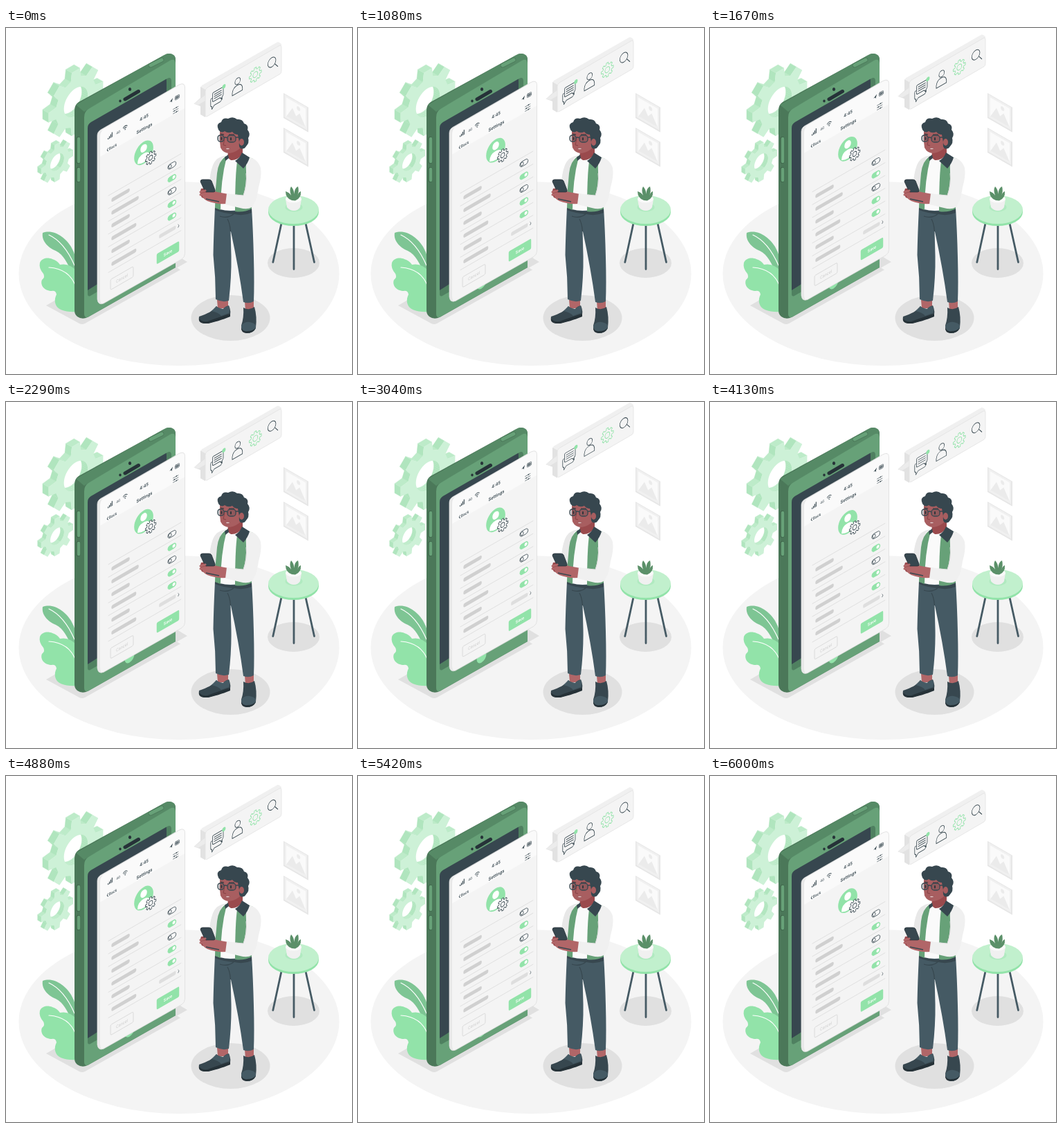
Write an HTML page that moves like this. It is 500 px wide and 500 px high and loops after 6.04 s.

```html
<!DOCTYPE html>
<html lang="en">
<head>
<meta charset="utf-8">
<title>Settings</title>
<style>
html, body { margin: 0; width: 100%; height: 100%; overflow: hidden; background: #fff; }
svg { display: block; width: 100vw; height: 100vh; }
text { font-family: Inter, "Open Sans", sans-serif; text-anchor: middle; }
.b { font-weight: 600; }
.line { fill: none; stroke: #37474f; stroke-width: .9; stroke-linecap: round; stroke-linejoin: round; }
.fine { stroke-width: .6; }
.vein { fill: none; stroke: #fff; stroke-width: 1.2; stroke-linecap: round; }
</style>
</head>
<body>
<svg viewBox="0 0 500 500">
  <!-- floor and shadows -->
  <ellipse cx="250" cy="355" rx="231.5" ry="133" fill="#f4f4f4"/>
  <g fill="#e0e0e0">
    <path d="M58 401L105 374L242 326L262 338L247 346.500L252 349.500L114 427Q110 429 106 427Z"/>
    <ellipse cx="324.500" cy="419" rx="57" ry="33"/>
    <ellipse cx="415.500" cy="339.500" rx="37.500" ry="21.500"/>
  </g>
  <g id="cogs"></g>

  <!-- plant by the phone -->
  <path d="M53 296C69 290 86 303 94 316Q103 331 103 352L95 352C88 340 84 328 72 322C60 317 51 307 53 296Z" fill="#7ec594"/>
  <path class="vein" d="M62 299Q84 309 99 343"/>
  <path d="M49 339C53 331 62 332 67 334Q74 336 78 342Q92 339 103 352V410C87 411 73 408 71 397Q70 391 73 385Q72 379 66 380C55 380 49 371 52 364Q57 360 54 355Q47 347 49 339Z" fill="#92e3a9"/>
  <path class="vein" d="M62 346C78 347 94 354 101 374"/>

  <!-- big phone -->
  <path d="M99 119Q99 111 105 107L228 39.500Q236 35 242 39Q245 41 245 46V346L118 418Q110 422 103 417Q99 414 99 408Z" fill="#4b7859"/>
  <path d="M101 111L228 39.500Q236 35 242 39Q245 41 245 47L119 117L113 121Z" fill="#568a66"/>
  <path d="M113 129Q113 121 119 117L237 47Q245 43 245 52V346L119 417.500Q113 420 113 413Z" fill="#67a178"/>
  <path d="M209 54L225 46" stroke="#4b7859" stroke-width="6.500" stroke-linecap="round"/>
  <path d="M209 54L225 46" stroke="#67a178" stroke-width="5" stroke-linecap="round"/>
  <g stroke-linecap="round" fill="none">
    <path d="M104.500 160V193M104.500 204V220" stroke="#3d6449" stroke-width="6"/>
    <path d="M105 160V193M105 204V220" stroke="#67a178" stroke-width="4.500"/>
  </g>
  <clipPath id="hole"><path d="M118 145Q118 139 123 136L233 73Q239 70 239 77V313Q239 318 235 321L122 387Q118 389 118 384Z"/></clipPath>
  <g clip-path="url(#hole)">
    <rect x="110" y="60" width="140" height="340" fill="#4f8060"/>
    <path d="M110 60H228Q232 70 232 78V307L118 379H110Z" fill="#37474f"/>
  </g>
  <g fill="#263238">
    <path d="M172 103L191.500 91.500" stroke="#263238" stroke-width="5" stroke-linecap="round"/>
    <ellipse cx="165" cy="105.500" rx="1.700" ry="2.100"/>
    <ellipse cx="179" cy="88.500" rx="2.100" ry="2.600"/>
  </g>
  <circle r="8" transform="matrix(.866 -.5 0 1 178.500 368.500)" fill="#92e3a9"/>

  <!-- settings sheet -->
  <g id="sheet">
    <path d="M132 155.500Q132 150 137 147L250 82Q258.500 78 258.500 86V326Q258.500 331 254 334L141 398Q133 401 132 392Z" fill="#f4f4f4" stroke="#dedede" stroke-width=".8"/>
    <path d="M133 156Q133 151 138 148L250 83Q258 79 258 87V116L138 185L133 188Z" fill="#fafafa"/>
    <path d="M132.500 155.500V392Q133 398 138 398Q136 396 136 390V157Q136 151 140 147Q132.500 150 132.500 155.500Z" fill="#e8e8e8"/>
    <g transform="matrix(.866 -.5 0 1 132 152)">
      <path d="M18 18V16M20.200 18V14.500M22.400 18V12.800M24.600 18V11" stroke="#37474f" stroke-width="1.300"/>
      <g fill="#37474f">
        <text x="35" y="18" font-size="5">4G</text>
        <text x="78" y="18.500" font-size="6.400" class="b">4:45</text>
        <text x="78.500" y="34.500" font-size="6.600" class="b">Settings</text>
        <text x="26" y="34.500" font-size="5.700" font-weight="500">Back</text>
        <path d="M120.500 15.500L126 12L124 17.500L123 15.500Z"/>
        <rect x="130.500" y="13" width="5.500" height="3.600" rx="1" fill="#6b777d"/>
        <circle cx="46.500" cy="17.800" r=".8"/>
      </g>
      <rect x="129.700" y="12.200" width="7.200" height="5.200" rx="1.300" class="line fine"/>
      <path class="line" d="M18 30.700L16.300 32.700L18 34.700M43 14.200Q46.500 11 50 14.200M44.600 16Q46.500 14.300 48.400 16"/>
      <path class="line fine" d="M126.500 28.800H135M126.500 32H135M126.500 35.200H135"/>
      <path d="M132 28.800h.1M128.500 32h.1M132 35.200h.1" stroke="#37474f" stroke-width="1.700" stroke-linecap="round"/>
      <circle cx="77.400" cy="67" r="16" fill="#92e3a9"/>
      <circle cx="77.400" cy="60.500" r="5.500" fill="#fff"/>
      <path d="M67 78Q67 68 77.400 68Q87.800 68 87.800 78Q77.400 84 67 78Z" fill="#fff"/>
      <path id="avatarCog" fill="#f8f8f8" stroke="#37474f" stroke-width=".9" stroke-linejoin="round" transform="translate(89 80)"/>
      <circle cx="89" cy="80" r="3.300" class="line"/>
      <g id="rows"></g>
      <rect x="103" y="198.500" width="28" height="5.500" rx="2" fill="#dedede"/>
      <path class="line fine" d="M134.800 199.500L136.300 201.500L134.800 203.500"/>
      <rect x="99" y="224" width="37.500" height="15" rx="2" fill="#92e3a9"/>
      <text x="117.700" y="233.800" font-size="6" class="b" fill="#fff">Save</text>
      <rect x="22" y="222.500" width="38" height="15" rx="2" fill="none" stroke="#d6d6d6" stroke-width=".8"/>
      <text x="41" y="232.300" font-size="6" fill="#cbcbcb">Cancel</text>
    </g>
  </g>

  <!-- floating menu -->
  <g id="menu">
    <path d="M281 86L283 83L392 20.500Q394 19.500 398 23.500V28L288 92Z" fill="#f0f0f0"/>
    <path d="M281 85L288 89V129L281 125V113L271.500 109.500L281 101Z" fill="#e2e2e2"/>
    <path d="M271.500 109.500L288 97V105L278 111Z" fill="#ececec"/>
    <path d="M288 92Q288 88 291 86L395 25.500Q398 24 398 28V62Q398 65 396 66.500L291 127.500Q288 129 288 126Z" fill="#f4f4f4" stroke="#e2e2e2" stroke-width=".8"/>
    <g transform="matrix(.866 -.5 0 1 288 89)">
      <path class="line" d="M11 18Q9 18 9 20V28Q9 30 11 30V34L15 30H25Q27 30 27 28V25"/>
      <path class="line" d="M14 11H28Q30 11 30 13V22Q30 24 28 24V28L24.500 24H14Q12 24 12 22V13Q12 11 14 11ZM15 14.500H27M15 17.500H27M15 20.500H27"/>
      <circle cx="31" cy="11" r="3" fill="#92e3a9"/>
      <circle cx="54" cy="14.800" r="4.500" class="line"/>
      <path class="line" d="M45 31.500V28Q46 20.500 53.500 20.500Q61 20.500 62 28V31.500Z"/>
      <path id="menuCog" fill="none" stroke="#92e3a9" stroke-linejoin="round" transform="translate(83.500 20)"/>
      <circle cx="83.500" cy="20" r="4" fill="none" stroke="#92e3a9"/>
      <circle cx="111" cy="16" r="6.700" class="line"/>
      <path class="line" d="M116 20.700L121 27"/>
    </g>
  </g>

  <g id="frames"></g>

  <!-- table -->
  <path d="M398.500 280L385.800 338.500M416 283V348.500M432.500 280L445.500 338.500" fill="none" stroke="#455a64" stroke-width="2.800" stroke-linecap="round"/>
  <path d="M379 262V266A36.500 20 0 0 0 452 266V262Z" fill="#92e3a9"/>
  <ellipse cx="415.500" cy="262.500" rx="36.500" ry="20.500" fill="#c1f0cd"/>
  <ellipse cx="416" cy="259" rx="12.500" ry="6.500" fill="#b0eac0"/>
  <path d="M404 247L406 259Q410 264 416 264Q422 264 425 259L427 247Z" fill="#f0f0f0"/>
  <ellipse cx="415.500" cy="247" rx="11.500" ry="5.500" fill="#fafafa"/>
  <path d="M413 249Q404 246 404 236Q410 238 412 242Q409 234 412 229Q416 233 416.500 240Q417 231 422 229Q424 236 421 242Q423 237 426 236Q427 246 418 249.500Z" fill="#5b9069"/>

  <!-- man -->
  <path d="M305 393H321V405H306ZM345 395H358V409H346Z" fill="#b16668"/>
  <path d="M279 417C291 413 299 409 304 402Q308 406 314 406Q317 402 322 401Q326 410 323 417C312 421 301 424 292 427Q277 428 279 417Z" fill="#37474f"/>
  <path d="M279 419Q281 425 291 424Q310 417 324 413V417C312 422 301 425 292 427Q277 428 279 419Z" fill="#263238"/>
  <path d="M297 409Q307 411 311 416L322 412Q324 406 322 402Q317 402 314 406Q307 405 304 402Z" fill="#455a64"/>
  <path d="M343 404Q351 409 359 403Q363 417 361 433Q357 441 348 441Q339 439 340 430Q344 418 343 404Z" fill="#37474f"/>
  <path d="M340 430Q345 424 352 425Q359 426 361 430V434Q357 441 348 441Q339 439 340 430Z" fill="#455a64"/>
  <path d="M340 433Q342 439 349 438Q357 438 361 433Q358 441 348 441Q339 440 340 433Z" fill="#263238"/>
  <path d="M302 259Q300 300 299.500 328Q303 360 303 392Q313 397 322 394Q326 360 325.500 330L324.500 292Q337 350 343 396Q351 399 358 395Q359 370 358 332Q357 292 355 260Z" fill="#455a64"/>
  <path d="M330 268Q321 276 309 272M320 276Q323.500 282 324.500 294" fill="none" stroke="#37474f" stroke-width="1.200"/>
  <path d="M302 259Q325 270 355 262V267Q343 272 330 269Q315 268 302 263Z" fill="#37474f"/>

  <path d="M318 184Q304 186 299 198Q294 212 294 226L303 238L311 225Z" fill="#e8e8e8"/>
  <path d="M312 188L324 183L344 185Q352 190 351 205L348 260Q327 267 309 262Z" fill="#fafafa"/>
  <path d="M318 185Q307 192 305 210Q302 235 302 260L310 263Q310 220 319 186Z" fill="#67a178"/>
  <path d="M343 184L357 189L355 261Q344 267 331 265Q331 215 334 193Z" fill="#67a178"/>

  <path d="M282 232Q279 239 283 245L291 248Q301 246 305 242L297 231Z" fill="#9a4a4d"/>
  <path d="M289 238Q295 233 305 237L321 240L319 254Q303 255 291 250Q284 247 283 240Z" fill="#b16668"/>
  <path d="M281 222Q281 219 284 219H293Q296 219 297 221L302 234Q303 237 300 237H290Q288 237 287 235Z" fill="#37474f" stroke="#263238" stroke-width=".8"/>
  <path d="M281 237L288 235M281 241L288 239" stroke="#b16668" stroke-width="3" stroke-linecap="round"/>
  <path d="M289 247L308 251" stroke="#37474f" stroke-width="1.500"/>
  <path d="M350 187Q363 188 368 202Q370 213 365 230Q362 252 355 259Q349 263 338 260L317 255L319 239L343 242Q348 225 347 207Q346 193 350 187Z" fill="#f0f0f0"/>
  <path d="M347 210Q349 226 343 242L332 241" fill="none" stroke="#dedede" stroke-width="1"/>

  <path d="M321 178L342 168L342 182Q334 192 325 191Q319 189 321 178Z" fill="#9a4a4d"/>
  <path d="M341 180L352 187Q350 195 343 203L331 192Q338 188 341 180Z" fill="#37474f"/>
  <path d="M321 183L316 187L317 192L322 188Z" fill="#37474f"/>
  <path d="M309 150Q308 162 310 173Q314 181 323 181Q334 179 340 172L345 155L336 143L313 143Z" fill="#a85e60"/>
  <path d="M307 147Q303 138 311 136Q313 129 321 131Q328 127 334 132Q342 131 344 138Q351 140 349 147Q354 153 350 159Q352 166 347 171Q344 176 339 174Q336 172 337 165L335 154Q330 154 327 150Q321 153 316 149Q311 153 307 147Z" fill="#37474f"/>
  <ellipse cx="340.500" cy="165" rx="3.500" ry="5" fill="#a85e60"/>
  <path d="M310 153L315 154M322 154L330 154" stroke="#263238" stroke-width="1.200"/>
  <g fill="#37474f" fill-opacity=".2" stroke="#37474f" stroke-width="1.300">
    <rect x="306" y="155" width="9" height="9" rx="3.500"/>
    <rect x="320" y="155" width="12" height="10" rx="4"/>
    <path d="M315 159Q317 157 320 159M332 158L341 158" fill="none"/>
  </g>
  <path d="M311.500 158.500V161M325 159V161.500" stroke="#263238" stroke-width="1.800" stroke-linecap="round"/>
  <path d="M316 160L314 169L318 170" fill="none" stroke="#864044" stroke-width="1"/>
  <path d="M317 174Q320 173 324 174Q322 176 319 175.500Z" fill="#f0d8d8" stroke="#864044" stroke-width=".5"/>
</svg>
<script>
const $ = id => document.getElementById(id);

// Outline of a cog with eight teeth, centred on the origin
function cog(outer, inner) {
  const pts = [];
  for (let k = 0; k < 8; k++)
    for (const [shift, r] of [[-.32, inner], [-.19, outer], [.19, outer], [.32, inner]]) {
      const a = (k + shift) * Math.PI / 4;
      pts.push([r * Math.cos(a), r * Math.sin(a)]);
    }
  return pts;
}
const toPath = pts => 'M' + pts.map(p => p.map(v => v.toFixed(2)).join(' ')).join('L') + 'Z';

// Extruded cog facing right, its depth running up and left
function solidCog(cx, cy, outer, inner, hole, depth) {
  const iso = ([x, y]) => [cx + .866 * x, cy + y - .5 * x];
  const back = ([x, y]) => [x - .866 * depth, y - .5 * depth];
  const ring = Array.from({ length: 40 }, (_, i) =>
    [hole * Math.cos(i * Math.PI / 20), hole * Math.sin(i * Math.PI / 20)]);
  const face = cog(outer, inner).map(iso), bore = ring.map(iso);
  let out = '';
  const walls = (pts, sign) => pts.forEach((p, i) => {
    const q = pts[(i + 1) % pts.length];
    const nx = (q[1] - p[1]) * sign, ny = (p[0] - q[0]) * sign;
    if (.866 * nx + .5 * ny >= 0) return;
    const fill = nx < 0 && ny > -.8 * Math.abs(nx) ? '#b0e5be' : '#bdebc9';
    out += `<path d="${toPath([p, q, back(q), back(p)])}" fill="${fill}" stroke="${fill}" stroke-width=".4"/>`;
  });
  walls(face, 1);
  walls(bore, -1);
  return out + `<path d="${toPath(face)}${toPath(bore)}" fill="#cdf1d7" fill-rule="evenodd"/>`;
}

$('cogs').innerHTML = solidCog(101, 107, 46, 34, 20, 10) + solidCog(74, 194, 27, 20, 11.5, 6);
$('avatarCog').setAttribute('d', toPath(cog(9, 6.6)));
$('menuCog').setAttribute('d', toPath(cog(10.2, 7.6)));

// Setting rows: label bar, separator, switch
const labelEnds = [54, 69, 54, 65, 54, 65], switches = [0, 1, 0, 1, 1];
let rows = '';
for (let i = 0; i < 7; i++)
  rows += `<path d="M18 ${99.5 + 18.5 * i}H140" stroke="#dcdcdc" stroke-width=".8"/>`;
labelEnds.forEach((end, i) => {
  const y = 108.8 + 18.5 * i;
  rows += `<rect x="23.5" y="${y - 2.8}" width="${end - 23.5}" height="5.6" rx="2.4" fill="#d0d0d0"/>`;
  if (i > 4) return;
  const on = switches[i];
  rows += `<rect x="117.7" y="${y - 3.6}" width="13.6" height="7.2" rx="3.6" fill="${on ? '#92e3a9' : '#fafafa'}" stroke="${on ? '#92e3a9' : '#37474f'}" stroke-width=".8"/>
    <circle cx="${on ? 127.7 : 121.3}" cy="${y}" r="2.4" fill="#fff" stroke="${on ? 'none' : '#37474f'}" stroke-width=".8"/>`;
});
$('rows').innerHTML = rows;

$('frames').innerHTML = [94, 144].map(y => `<g transform="matrix(.866 .5 0 1 401 ${y})">
  <rect width="41.5" height="36" fill="#e6e6e6"/>
  <rect x="1.5" y="1" width="38" height="33" fill="#f0f0f0"/>
  <rect x="4.5" y="4" width="32.5" height="27" fill="#fafafa"/>
  <path d="M5 31L15 14L21 23L27 16L37 31Z" fill="#ebebeb"/>
  <circle cx="25" cy="10" r="3" fill="#ebebeb"/></g>`).join('');

const LOOP = 6040;
function draw(now) {
  const lift = 1 - Math.abs(2 * (now % LOOP) / LOOP - 1);
  $('sheet').setAttribute('transform', `translate(0 ${-10 * lift})`);
  $('menu').setAttribute('transform', `translate(0 ${-19.5 * lift})`);
  requestAnimationFrame(draw);
}
draw(performance.now());
</script>
</body>
</html>
```
